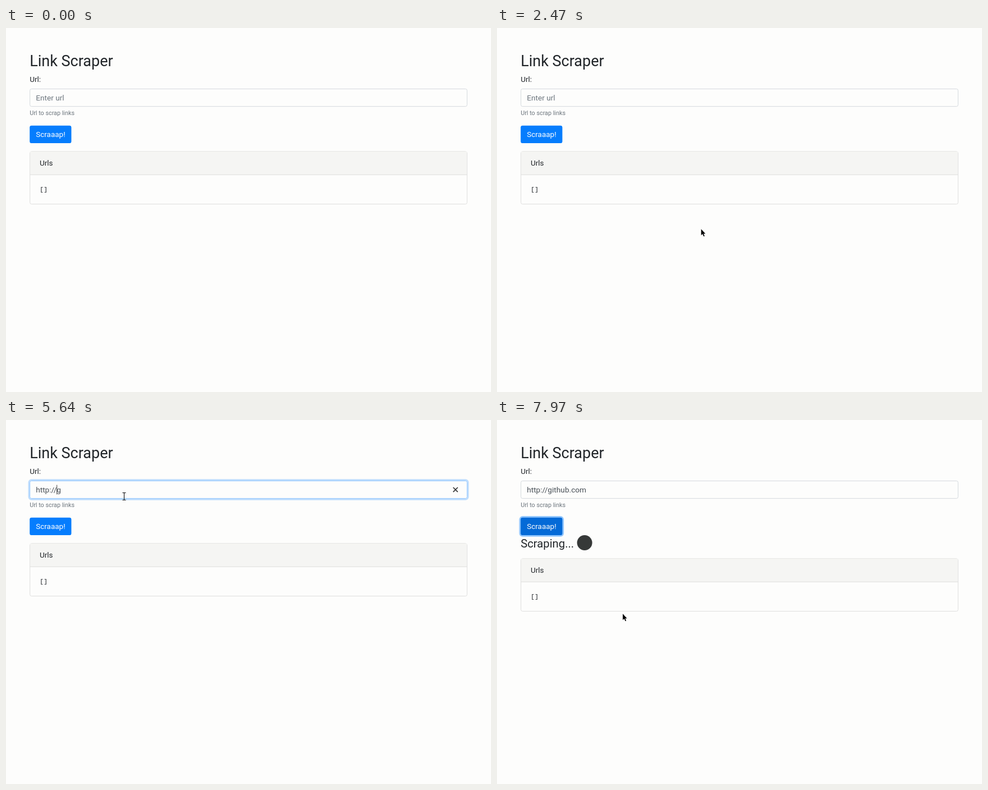
Recreate the animation shown at these times as an HTML page. Size 864 by 648 pixels, loop 8 s.

```html
<!DOCTYPE html>
<html lang="en">
<head>
<meta charset="utf-8">
<title>Link Scraper</title>
<style>
html, body { margin: 0; width: 100%; height: 100%; overflow: hidden; background: #fdfdfc; }
#page {
  position: absolute; width: 1024px; height: 768px;
  transform: scale(.84375); transform-origin: 0 0;
  font: 16px/24px Roboto, sans-serif; color: #212529;
}
#page > * { position: absolute; left: 50px; box-sizing: border-box; white-space: pre; }
h2, h4 { margin: 0; font-weight: 400; }
h2 { top: 50.6px; font-size: 32px; line-height: 38.4px; }
label { top: 97px; }
#field {
  top: 128.4px; width: 924px; height: 38px; padding: 6.6px 12px;
  border: 1px solid; border-radius: 4px; color: #495057; font-size: 16.2px;
}
#hint { color: #6c757d; }
#caret { position: absolute; top: 8px; width: 1.2px; height: 20px; background: #222; }
#clear { position: absolute; left: 892px; top: 12px; width: 12px; height: 12px; stroke: #333; stroke-width: 2; }
small { top: 170.4px; font-size: 12.8px; line-height: 19.2px; color: #6c757d; }
#btn { top: 206px; height: 37px; padding: 6.6px 13px; border-radius: 4px; color: #fff; }
#busy { top: 247.1px; font-size: 24px; line-height: 28.8px; }
#dot { top: 243px; left: 169px !important; width: 32px; height: 32px; border-radius: 50%; background: #353837; }
#card { top: 259.6px; width: 924px; border: 1px solid #dadad9; border-radius: 4px; }
#card div { padding: 12px 20px; background: #f5f5f3; border-bottom: 1px solid #dadad9; }
pre { margin: 21.4px 20px 18.6px; font: 14px/21px "Liberation Mono", monospace; }
#mouse { position: absolute; left: 0; top: 0; width: 864px; height: 648px; }
</style>
</head>
<body>
<div id="page">
  <h2>Link Scraper</h2>
  <label>Url:</label>
  <div id="field"><span id="hint">Enter url</span><span id="before"></span><i id="caret"></i><span id="after"></span><svg id="clear" viewBox="0 0 12 12"><path d="M1.2 1.2 10.8 10.8M10.8 1.2 1.2 10.8"/></svg></div>
  <small>Url to scrap links</small>
  <div id="btn">Scraaap!</div>
  <h4 id="busy">Scraping...</h4>
  <div id="dot"></div>
  <div id="card"><div>Urls</div><pre>[]</pre></div>
</div>
<svg id="mouse" viewBox="0 0 864 648">
  <g id="pointer">
    <path id="arrow" d="M0 0V11L2.6 8.7 4.5 13 6.2 12.4 4.4 8.2H7.6Z" stroke="#fff" stroke-width=".8" paint-order="stroke"/>
    <path id="beam" d="M-3 -6.5H3M0 -6.5V6.5M-3 6.5H3" fill="none" stroke="#111" stroke-width="1.1"/>
    <path id="hand" d="M4.5 11V2Q5.8 -.6 7.1 2V7.5L12 8.3 14 10V13L12.8 17V19H6.3V17.5L2 11.5Q2.6 9 4.5 11ZM7.1 7V11M9.7 8V11M12 8.3V11" fill="#fff" stroke="#111"/>
  </g>
</svg>
<script>
const el = id => document.getElementById(id);
const show = (id, on) => { el(id).style.display = on ? '' : 'none'; };
const clamp = v => Math.max(0, Math.min(1, v));
const smooth = k => k * k * (3 - 2 * k);
const mix = (a, b, k) => `rgb(${a.map((v, i) => v + (b[i] - v) * k)})`;

const LOOP = 8000, ENTER = 30, FOCUS = 3075, HOVER = 7365, PRESS = 7510, CLICK = 7595;
const CARET_LAG = 28;

// Bursts of typing at an even pace
const bursts = [
  { text: 'htt', at: 3730, gap: 80 },
  { text: 'p:/', at: 4100, gap: 455 },
  { text: '/', at: 5270, gap: 0 },
  { text: 'github.c', at: 5640, gap: 85 },
  { text: 'om', at: 6440, gap: 250 }
];
const url = bursts.map(b => b.text).join('');
const keys = bursts.flatMap(b => [...b.text].map((_, i) => b.at + i * b.gap));

// Curved pointer moves, each leaving from where the last one ended
const moves = [
  { from: ENTER, to: 1450, bend: [320, 300], end: [168, 374] },
  { from: 1860, to: 1900, bend: [246, 396], end: [325, 418] },
  { from: 2060, to: 2880, bend: [460, 440], end: [210.5, 136] },
  { from: 7060, to: 7505, bend: [140, 184], end: [90, 190] },
  { from: 7600, to: 7970, bend: [150, 260], end: [224, 345] }
];

function pointerAt(t) {
  let pos = [3, 3];
  for (const { from, to, bend, end } of moves) {
    const k = smooth(clamp((t - from) / (to - from)));
    pos = pos.map((p, i) => (1 - k) ** 2 * p + 2 * k * (1 - k) * bend[i] + k * k * end[i]);
  }
  return pos;
}

const fade = (t, start) => smooth(clamp((t - start) / 150));

function drawField(t) {
  const focused = t >= FOCUS && t < PRESS;
  const glow = fade(t, FOCUS) - fade(t, PRESS);
  const typed = keys.filter(k => k <= t).length;
  const passed = keys.filter(k => k + CARET_LAG <= t).length;
  const since = t - (passed ? keys[passed - 1] + CARET_LAG : FOCUS - 5);
  const style = el('field').style;
  style.borderColor = mix([206, 212, 218], [128, 189, 255], glow);
  style.boxShadow = `0 0 0 ${3.2 * glow}px rgba(0,123,255,${.25 * glow})`;
  el('before').textContent = url.slice(0, passed);
  el('after').textContent = url.slice(passed, typed);
  show('hint', t < FOCUS);
  show('caret', focused && since % 1000 < 500);
  show('clear', focused && typed > 0);
}

function drawButton(t) {
  const ring = fade(t, PRESS);
  const style = el('btn').style;
  style.background = mix([6, 125, 253], [4, 106, 215], fade(t, HOVER));
  style.boxShadow = `0 0 0 ${3.2 * ring}px rgba(38,143,255,${.5 * ring})`;
}

function drawBusy(t) {
  const busy = t >= CLICK;
  const k = busy ? (t - CLICK) % 750 / 375 : 0;
  show('busy', busy);
  show('dot', busy);
  el('dot').style.transform = `scale(${Math.min(1, k)})`;
  el('dot').style.opacity = k < 1 ? k : 2 - k;
  el('card').style.top = (busy ? 291.6 : 259.6) + 'px';
}

function drawPointer(t) {
  const [x, y] = pointerAt(t);
  const inField = x >= 42 && x <= 822 && y >= 108 && y <= 140;
  const onButton = x >= 42 && x <= 116 && y >= 174 && y <= 205;
  show('pointer', t >= ENTER);
  show('beam', inField);
  show('hand', onButton);
  show('arrow', !inField && !onButton);
  el('pointer').setAttribute('transform', `translate(${x} ${y})`);
}

const start = performance.now();
function frame() {
  const t = (performance.now() - start) % LOOP;
  drawField(t);
  drawButton(t);
  drawBusy(t);
  drawPointer(t);
  requestAnimationFrame(frame);
}
frame();
</script>
</body>
</html>
```
